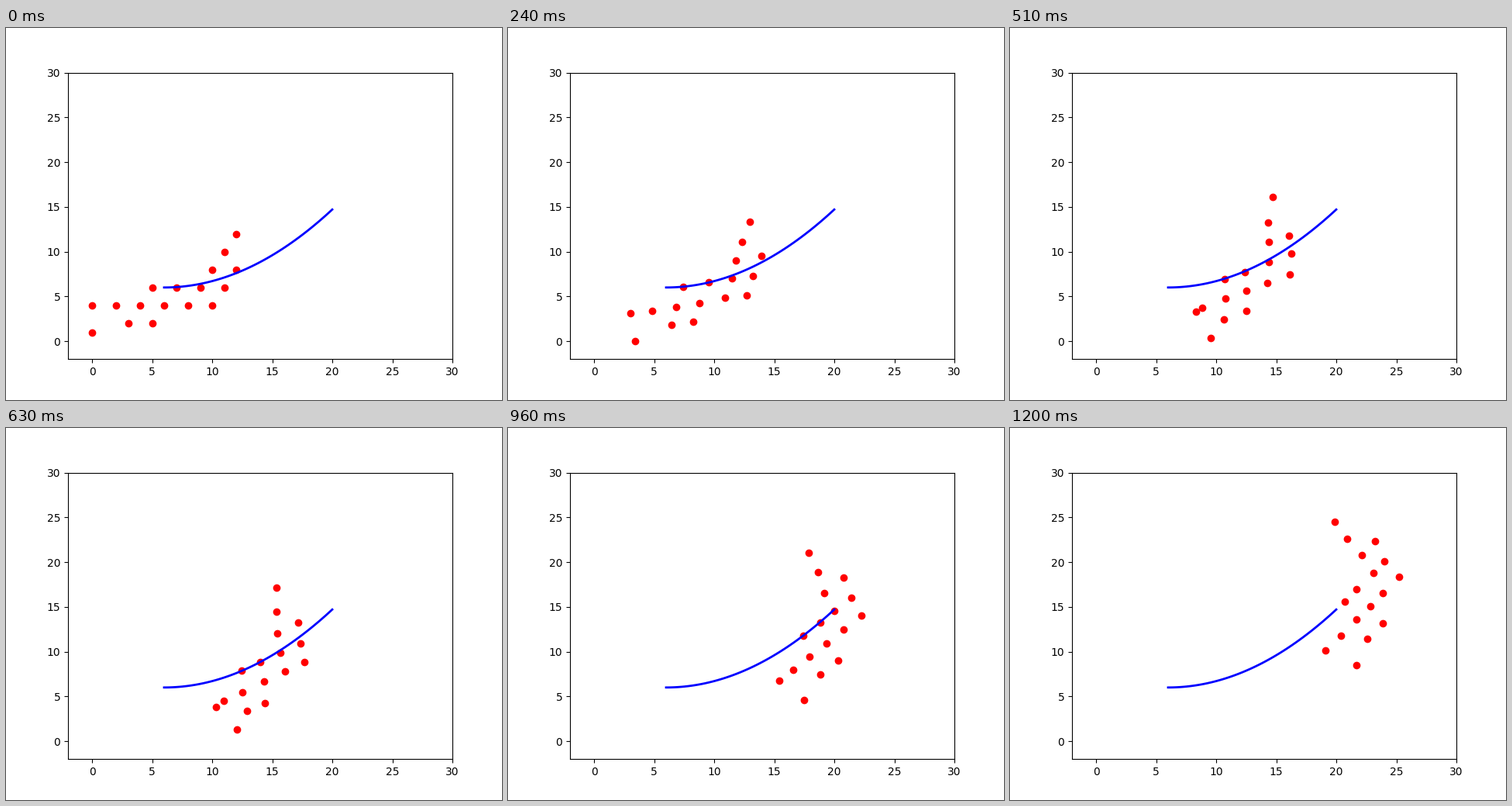
Animation, 640 px wide and 480 px high, one loop 1230 ms. Source, as a matplotlib script:

```python
import numpy as np
import matplotlib.pyplot as plt
from matplotlib.animation import FuncAnimation

FRAMES = 41
INTERVAL = 30
START = 6.0
STRIDE = 0.8
NOISE = 0.16
CURVE = 2 / 45

# Initial formation: height -> x positions in that row.
ROWS = {
    1: [0],
    2: range(3, 6, 2),
    4: range(0, 11, 2),
    6: range(5, 12, 2),
    8: range(10, 13, 2),
    10: [11],
    12: [12],
}
LEADERS = {(0, 1), (0, 4), (12, 12)}


def path(x):
    return 6 + CURVE * (x - START) ** 2


agents = [(x, y) for y, row in ROWS.items() for x in row]
is_leader = np.array([agent in LEADERS for agent in agents])
initial = np.array(agents, float)
shape = initial - (START, path(START))

# One error per agent and step, added to both coordinates.
rng = np.random.default_rng(4)
errors = rng.uniform(-NOISE, NOISE, (FRAMES // 2, len(agents), 1))


def pose(step):
    """Formation moved along the path and turned to its tangent."""
    if step < 0:
        return initial
    x = START + STRIDE * step
    angle = np.arctan(2 * CURVE * (x - START))
    c, s = np.cos(angle), np.sin(angle)
    turned = shape @ np.array([(c, s), (-s, c)])
    return turned + (x, path(x)) + errors[step]


def positions(frame):
    # Leaders move on odd frames, followers catch up on even ones.
    lead = pose((frame - 1) // 2)
    follow = pose(frame // 2 - 1)
    return np.where(is_leader[:, None], lead, follow)


fig = plt.figure(figsize=(6.4, 4.8), dpi=100)
ax = fig.add_subplot(xlim=(-2, 30), ylim=(-2, 30))
dots, = ax.plot([], [], "ro")
xs = np.linspace(START, 20, 100)
ax.plot(xs, path(xs), "b", lw=2)


def update(frame):
    dots.set_data(*positions(frame).T)
    return dots,


anim = FuncAnimation(fig, update, frames=FRAMES, interval=INTERVAL,
                     repeat=True, repeat_delay=0)
plt.show()
```
